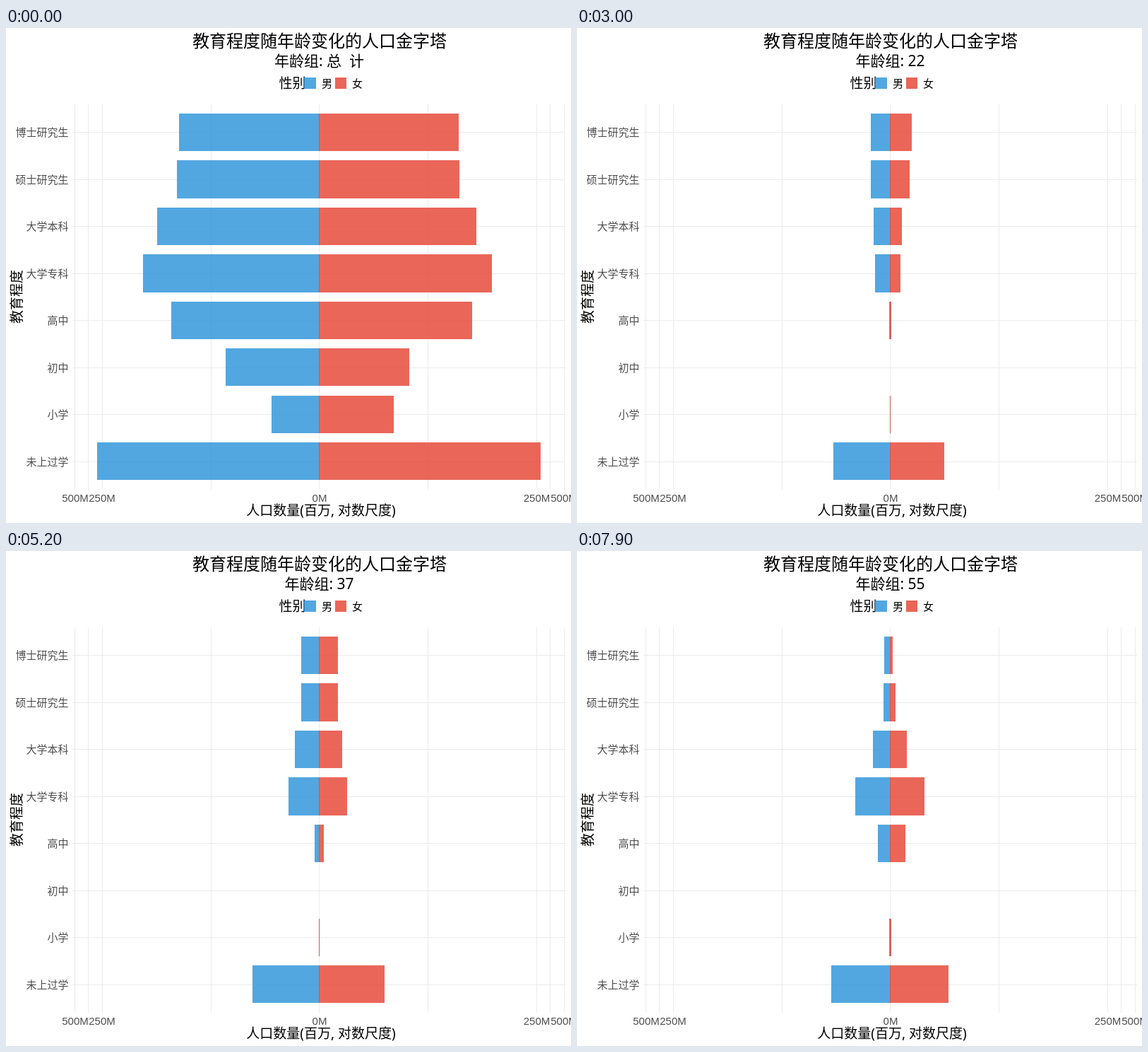
An HTML page that plays this animation: 800x700 px, repeating every 8 s.

```html
<!DOCTYPE html>
<html lang="zh-CN">
<head>
<meta charset="utf-8">
<style>
  html, body { margin: 0; width: 100%; height: 100%; overflow: hidden; background: #fff; }
  svg { display: block; }
  text { font-family: "Noto Sans", "Noto Sans CJK SC", "Noto Sans CJK JP", sans-serif; }
  .axis { font-size: 15px; fill: #4d4d4d; }
  .num { font-family: "Liberation Sans", Arial, sans-serif; }
  .mid { text-anchor: middle; }
  .end { text-anchor: end; }
  .male { fill: #3498db; fill-opacity: .85; }
  .female { fill: #e74c3c; fill-opacity: .85; }
</style>
</head>
<body>
<svg id="stage" width="800" height="700" viewBox="0 0 800 700"></svg>
<script>
const stage = document.getElementById('stage');
const CENTER = 443.5, UNIT = 55.6, STEP = 100, LOOP = 8000;

function add(tag, attrs, content = '') {
  const el = document.createElementNS('http://www.w3.org/2000/svg', tag);
  for (const key in attrs) el.setAttribute(key, attrs[key]);
  el.textContent = content;
  return stage.appendChild(el);
}
const label = (content, x, y, size, cls = '') =>
  add('text', { x, y, class: cls, style: size ? `font-size:${size}px` : '' }, content);

const bump = (x, mid, width) => Math.exp(-(((x - mid) / width) ** 2));
const rise = (x, mid, slope = 2.2) => 1 / (1 + Math.exp(-slope * (x - mid)));

// Millions of people of one age; woman is 0 or 1.
function people(age, woman) {
  const men = 2.76 + .18 * bump(age, 7, 5) + 1.3 * bump(age, 19, 1.5)
    + 2.9 * bump(age, 31.5, 7) + 1.8 * bump(age, 48.5, 7);
  return woman ? men * (.975 - .17 * bump(age, 0, 22)) : men;
}

// Millions in each row, top to bottom: pupils pass through the school stages,
// adults follow trends over age.
function counts(age, woman) {
  const t = age - 22;
  const basic = .0085 * Math.exp((.0765 + .0075 * woman) * t);
  const adult = [
    .2 + .045 * woman - (.0047 + .0021 * woman) * t,
    .2 + .02 * woman - (.0045 + .0009 * woman) * t,
    .19 - (.00011 + .00009 * woman) * (age - 38 - 3 * woman) ** 2,
    .148 - .045 * woman + (.0077 + .0013 * woman) * t,
    basic, 0, basic * .06
  ];
  const [nursery, primary, middle, high] = [3.6, 5.2, 12, 15].map(a => rise(age, a));
  const pupil = [0, 0, high, middle - high, primary - middle, nursery - primary, 1 - nursery];
  const grown = rise(age, 18, 1.6), all = people(age, woman);
  return adult
    .map((share, i) => Math.max(0, all * (share * grown + .93 * pupil[i] * (1 - grown))))
    .concat(all);
}

// Row name and its overall bar lengths.
const rows = [
  ['博士研究生', 198.5, 197.5], ['硕士研究生', 201.5, 198.5],
  ['大学本科', 229.5, 222.5], ['大学专科', 249.5, 244.5],
  ['高中', 209.5, 216.5], ['初中', 132.5, 127.5],
  ['小学', 67.5, 105.5], ['未上过学', 314.5, 313.5]
].map(([name, ...total]) => ({ name, total }));

// Every group of ages comes first as a subtotal, then year by year.
const states = [{ name: '总\u00a0\u00a0计' }];
for (let from = 3, to = 9; from < 60; from = to + 1, to += 5) {
  states.push({ name: `${from}-${to}岁`, from, to });
  for (let age = from; age <= to; age++) states.push({ name: age, from: age, to: age });
}

// Bars are on a log(1 + x) scale.
function barLengths(state, woman) {
  if (!state.from) return rows.map(r => r.total[woman]);
  const sums = rows.map(() => 0);
  for (let age = state.from; age <= state.to; age++)
    counts(age, woman).forEach((n, i) => sums[i] += n);
  return sums.map(n => UNIT * Math.log1p(n));
}

let grid = '';
for (const x of [97, 116, 136, 290, 443, 597, 751, 770, 790]) grid += `M${x + .5} 108V653`;
rows.forEach((r, i) => grid += `M94 ${Math.round(147 + 66.5 * i) + .5}H793`);
add('path', { d: grid, stroke: '#ebebeb', fill: 'none' });

label('教育程度随年龄变化的人口金字塔', 444, 27, 24, 'mid');
const subtitle = label('', 443.5, 54, 21, 'mid');
label('性别', 386.5, 85, 19);
add('rect', { x: 422, y: 70, width: 17, height: 16, class: 'male' });
add('rect', { x: 466, y: 70, width: 16, height: 16, class: 'female' });
label('男', 447, 84, 15);
label('女', 490, 84, 15);
label('人口数量(百万, 对数尺度)', 446, 689, 19, 'mid');
label('教育程度', 0, 0, 19, 'mid').setAttribute('transform', 'translate(22 380) rotate(-90)');
[['500M', 98], ['250M', 136], ['0M', 444], ['250M', 751.5], ['500M', 790]]
  .forEach(([s, x]) => label(s, x, 670, 0, 'axis num mid'));

rows.forEach((r, i) => {
  label(r.name, 88.5, Math.round(153 + 66.5 * i), 0, 'axis end');
  const y = Math.round(121 + 66.44 * i), height = Math.round(174.2 + 66.44 * i) - y;
  r.bars = ['male', 'female'].map(cls => add('rect', { x: 443, y, width: 0, height, class: cls }));
});

// Both bars cover the pixel column at the centre.
function show(state) {
  subtitle.textContent = `年龄组: ${state.name}`;
  const men = barLengths(state, 0), women = barLengths(state, 1);
  rows.forEach(({ bars: [male, female] }, i) => {
    const left = Math.min(443, Math.round(CENTER - men[i]));
    const right = Math.max(444, Math.round(CENTER + women[i]));
    male.setAttribute('x', left);
    male.setAttribute('width', men[i] > .03 ? 444 - left : 0);
    female.setAttribute('width', women[i] > .03 ? right - 443 : 0);
  });
}

// 81 states are spread over 100 steps; the loop plays the first 80 steps.
const start = performance.now();
let shown = -1;
function tick() {
  const time = Math.max(0, performance.now() - start) % LOOP;
  const index = Math.round(Math.floor(time / STEP) * 80 / 99);
  if (index !== shown) show(states[shown = index]);
  requestAnimationFrame(tick);
}
tick();
</script>
</body>
</html>
```
